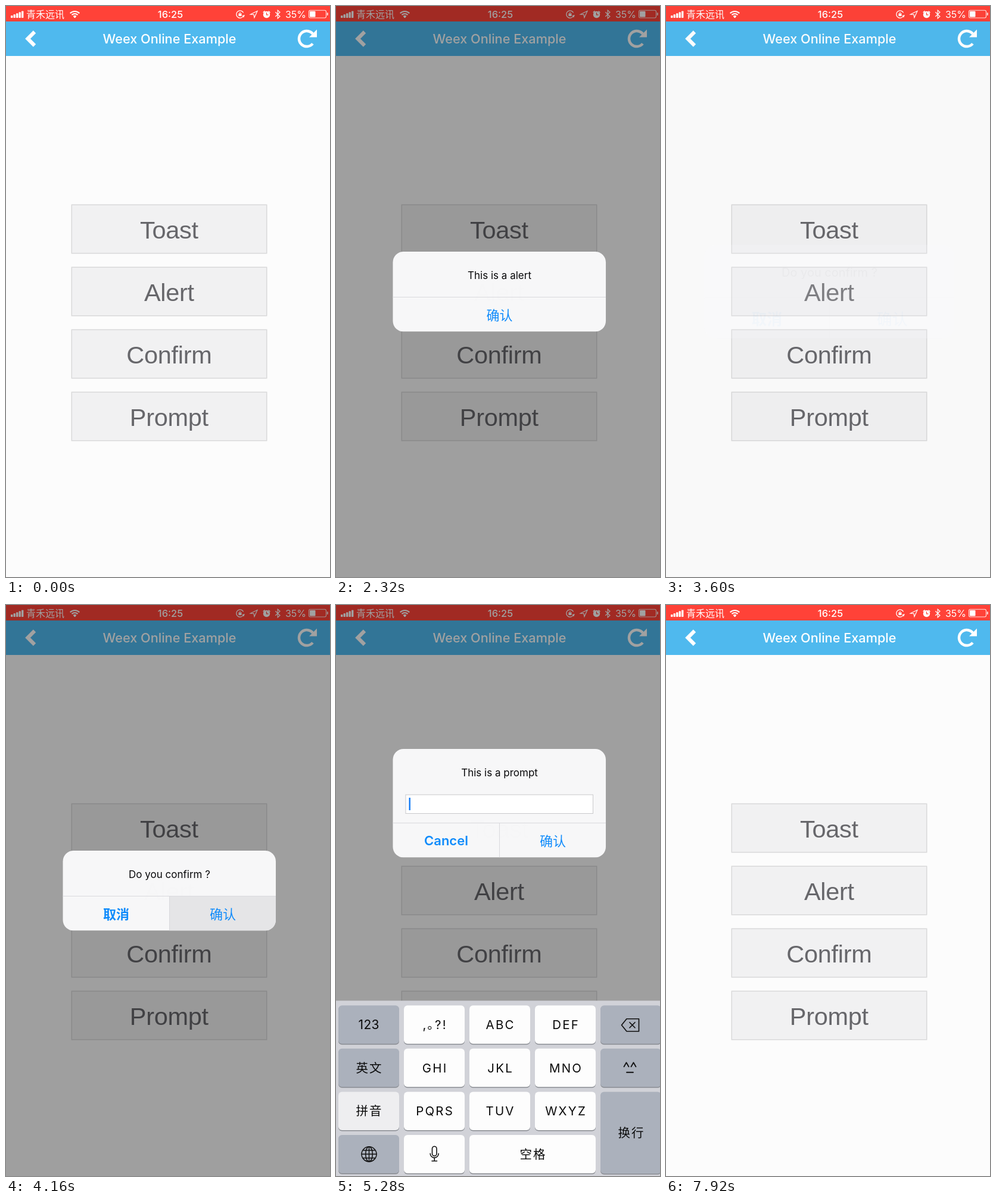
Animation, 544 px wide and 960 px high, one loop 8000 ms. Source, as an HTML page with a canvas:

```html
<!DOCTYPE html>
<html lang="zh">
<head>
<meta charset="utf-8">
<title>Modal demo</title>
<style>
html, body { margin: 0; width: 100%; height: 100%; overflow: hidden; background: #fff; }
canvas { display: block; width: 544px; height: 960px; }
</style>
</head>
<body>
<canvas id="stage"></canvas>
<script>
const W = 544, H = 960, LOOP = 8000;
const canvas = document.getElementById('stage');
const dpr = window.devicePixelRatio || 1;
canvas.width = W * dpr;
canvas.height = H * dpr;
const c = canvas.getContext('2d');

const SANS = 'Inter, "Noto Sans CJK SC", "Noto Sans CJK", sans-serif';
const CJK = '"Noto Sans CJK SC", "Noto Sans CJK", sans-serif';
const WIDE = '"Liberation Sans", Arial, sans-serif';
const BLUE = '#0f8bfb';

// Critically damped settle: 0 before start, then approaches 1
function settle(t, start, w = 0.0228) {
  if (t <= start) return 0;
  const x = (t - start) * w;
  return 1 - (1 + x) * Math.exp(-x);
}
const shown = (t, from, to) => t < to ? settle(t, from) : 1 - settle(t, to);

function text(s, x, y, size, color, o = {}) {
  const ls = o.ls || 0;
  c.font = `${o.weight || 400} ${size}px ${o.font || SANS}`;
  c.letterSpacing = ls + 'px';
  c.textAlign = o.align || 'center';
  c.textBaseline = 'alphabetic';
  c.fillStyle = color;
  c.fillText(s, c.textAlign === 'center' ? x + ls / 2 : x, y);
  c.letterSpacing = '0px';
}

// Text with its capitals or ideographs centred on y
function label(s, x, y, size, color, o = {}) {
  const cjk = s.charCodeAt(0) > 0x2fff;
  text(s, x, y + size * (cjk ? 0.375 : 0.363), size, color, { font: cjk ? CJK : SANS, ...o });
}

function rect(x, y, w, h, color) {
  c.fillStyle = color;
  c.fillRect(x, y, w, h);
}

function round(x, y, w, h, r, color) {
  c.beginPath();
  c.roundRect(x, y, w, h, r);
  c.fillStyle = color;
  c.fill();
}

function line(points, width, color, close) {
  c.beginPath();
  points.forEach(([x, y], i) => i ? c.lineTo(x, y) : c.moveTo(x, y));
  if (close) c.closePath();
  c.lineWidth = width;
  c.strokeStyle = color;
  c.stroke();
}

function shape(points, color) {
  c.beginPath();
  points.forEach(([x, y]) => c.lineTo(x, y));
  c.closePath();
  c.fillStyle = color;
  c.fill();
}

function arc(x, y, r, a, b, width, color) {
  c.beginPath();
  c.arc(x, y, r, a, b);
  c.lineWidth = width;
  c.strokeStyle = color;
  c.stroke();
}

function disc(x, y, r, color) {
  c.beginPath();
  c.arc(x, y, r, 0, Math.PI * 2);
  c.fillStyle = color;
  c.fill();
}

function statusBar() {
  const ink = '#fff', red = '#ff4238';
  rect(0, 0, W, 26, red);
  for (let i = 0; i < 5; i++) {
    const h = 4 + i * 1.9;
    round(8 + i * 4.5, 20 - h, 3.4, h, 0.8, ink);
  }
  text('青禾远讯', 34, 19.5, 16, ink, { align: 'left', font: CJK });
  for (const r of [4, 8, 12]) arc(115.5, 20, r - 1, -Math.PI * 0.75, -Math.PI * 0.25, 2.2, ink);
  disc(115.5, 18.4, 1.6, ink);
  text('16:25', 276, 19.8, 16.5, ink, { weight: 500 });

  arc(393, 14, 6.2, 0.5, Math.PI * 1.85, 1.3, ink);
  shape([[396.5, 16], [401, 15], [399, 19.5]], ink);
  rect(390.5, 13, 5, 4, ink);
  arc(393, 13, 1.7, Math.PI, 0, 1, ink);
  line([[410.5, 14], [422, 8.5], [417, 19.5], [416, 14.3]], 1.2, ink, true);
  disc(437.5, 14.5, 5.7, ink);
  arc(437.5, 14.5, 6.6, -2.6, -2, 1.6, ink);
  arc(437.5, 14.5, 6.6, -1.1, -0.5, 1.6, ink);
  line([[437.5, 11], [437.5, 14.8], [440.5, 14.8]], 1.2, red);
  line([[452.3, 10.3], [460, 17.5], [456.2, 21], [456.2, 7], [460, 10.5], [452.3, 17.7]], 1.2, ink);
  text('35%', 486.5, 19.6, 16, ink);
  c.beginPath();
  c.roundRect(508.5, 7.2, 29, 12.8, 2.5);
  c.lineWidth = 1.1;
  c.strokeStyle = 'rgba(255,255,255,.85)';
  c.stroke();
  round(510, 8.8, 9.5, 9.6, 1, ink);
  round(538.8, 11, 2, 5, 1, 'rgba(255,255,255,.85)');
}

function header() {
  rect(0, 26, W, 58, '#4fb9ee');
  line([[48, 43.5], [36.5, 55], [48, 66.5]], 6.2, '#fff');
  text('Weex Online Example', 274.5, 63, 21.7, '#fff', { weight: 500 });
  arc(505, 55, 13, 0.7, Math.PI * 1.78, 4.6, '#fff');
  shape([[522, 39.5], [522, 52.5], [509, 52.5]], '#fff');
}

function page() {
  rect(0, 84, W, H - 84, '#fcfcfc');
  ['Toast', 'Alert', 'Confirm', 'Prompt'].forEach((name, i) => {
    const y = 334 + i * 105;
    rect(109.5, y - 0.5, 329, 83, '#d9d9da');
    rect(111, y + 1, 326, 80, '#f1f1f2');
    text(name, 274, y + 57, 41.5, '#67676b', { font: WIDE, ls: -0.3 });
  });
}

function dim(a) {
  if (a > 0.002) rect(0, 0, W, H, `rgba(0,0,2,${0.37 * a})`);
}

function toast(t) {
  if (t < 1120 || t > 1620) return;
  const k = Math.max(0, (t - 1420) / 200);
  c.save();
  c.globalAlpha = 1 - k * k * (3 - 2 * k);
  round(148, 466, 248, 112, 10, 'rgba(0,0,0,.72)');
  text('This is a toast', 272, 530, 22.5, '#fff', { weight: 600 });
  c.restore();
}

// d: top, height, title, buttons, from, to, press
function dialog(t, d) {
  const a = shown(t, d.from, d.to);
  if (t < d.from || a < 0.002) return;
  const mid = d.top + d.height / 2, sep = d.top + d.height - 58;
  const grow = t < d.to ? 1 + 0.18 * (1 - a) : 1;
  c.save();
  c.translate(274.5, mid);
  c.scale(grow, grow);
  c.translate(-274.5, -mid);

  c.save();
  c.beginPath();
  c.roundRect(95.5, d.top, 357.5, d.height, 18);
  c.clip();
  c.globalAlpha = Math.sqrt(a);
  rect(95, d.top, 359, d.height, 'rgba(249,249,250,.985)');
  c.globalAlpha = a;
  if (t >= d.press) {
    const x = d.buttons.length > 1 ? 275 : 95;
    rect(x, sep, 454 - x, 58, '#e5e5e7');
  }
  rect(95, sep - 0.5, 359, 1, '#d9d9dd');
  if (d.buttons.length > 1) rect(274, sep, 1, 58, '#d9d9dd');
  c.restore();

  c.globalAlpha = a;
  label(d.title, 274.5, d.top + 39.5, 17, '#08080a');
  const y = sep + 30;
  if (d.buttons.length > 1) {
    label(d.buttons[0], 185, y, 22, BLUE, { weight: 600 });
    label(d.buttons[1], 364, y, 22, BLUE);
  } else {
    label(d.buttons[0], 274.5, y, 22, BLUE);
  }
  if (d.body) d.body(d.top);
  c.restore();
}

// Typing: time, column and row of the key, composed text after it
const taps = [
  [5680, 3, 1, 'n'], [5920, 1, 1, 'ni'], [6140, 1, 1, 'ni h'],
  [6340, 2, 0, 'ni ha'], [6560, 3, 1, 'ni hao']
];
const COMMIT = 6880, PRESS = 7280, CLOSE = 7500, OPEN = 4870;

function composed(t) {
  if (t >= COMMIT) return '';
  return taps.reduce((s, k) => t >= k[0] + 70 ? k[3] : s, '');
}

function field(t) {
  return top => {
    const typing = composed(t), value = t >= COMMIT ? '你好' : typing;
    rect(116.5, top + 76.5, 315.5, 32.5, '#c9c9cc');
    rect(117.5, top + 77.5, 313.5, 30.5, '#fff');
    c.font = `16.5px ${SANS}`;
    const w = value ? c.measureText(value).width : 0;
    if (typing) rect(122, top + 82, w + 1, 21, '#d3d5db');
    if (value) text(value, 122.5, top + 98.5, 16.5, '#08080a', { align: 'left' });
    rect(122.5 + w, top + 82, 2.5, 21, '#1a7ff5');
  };
}

function hand(x, y) {
  c.save();
  c.translate(x, y);
  c.rotate(-0.5);
  c.lineCap = 'round';
  const skin = '#f2a58e';
  for (let i = 0; i < 4; i++) {
    const fx = -5 + i * 4;
    line([[fx * 0.8, 2], [fx, i === 0 || i === 3 ? -8 : -11]], 4, skin);
  }
  line([[4, 7], [11, 0]], 4.2, skin);
  c.beginPath();
  c.ellipse(0.5, 5, 8, 8, 0, 0, Math.PI * 2);
  c.fillStyle = skin;
  c.fill();
  arc(0, 0, 15, -0.9, -0.3, 1.2, '#777');
  arc(0, 0, 15, 2.2, 2.8, 1.2, '#777');
  c.restore();
}

function suggestions(t) {
  const typing = composed(t);
  rect(0, 565, W, 42, '#fafafa');
  rect(0, 565, W, 1, '#d0d0d3');
  rect(0, 607, W, 58, '#fdfdfd');
  rect(0, 606.5, W, 1, '#cfcfd2');
  if (!typing) return;
  ['mi', 'ni', 'm', 'n'].forEach((s, i) =>
    text(s, 30 + i * 59.5, 594, 20, '#8b8b8f'));
  rect(0, 607, 81, 58, '#e2e2e5');
  const full = typing.length > 4;
  const words = full ? ['你好', '', '你敢', '米高', '你搞', '你干', '你高'] : ['你', '米', '尼', '泥', '呢', '拟', '妮'];
  c.save();
  c.beginPath();
  c.rect(0, 607, 489, 58);
  c.clip();
  words.forEach((s, i) => {
    const x = i === 0 ? 40 : i === 1 ? 111 : 180.5 + (i - 2) * 80.7;
    if (s) label(s, x, 636, 26.5, '#0a0a0a');
    else hand(x, 636);
  });
  c.restore();
  rect(489, 607, 1, 58, '#c4c4c8');
  line([[509, 641], [519, 631.5], [529, 641]], 1.8, '#222');
}

const colX = i => 4 + i * 110;
const rowY = i => 673 + i * 72.6;

function key(col, row, s, o = {}) {
  const x = colX(col), y = rowY(row);
  const w = o.w || 102, h = o.h || 64.5;
  const dark = '#abb1bc', base = o.dark ? dark : o.fill || '#fdfdfd';
  round(x, y + 1.5, w, h, 6, '#898c92');
  round(x, y, w, h, 6, o.down ? dark : base);
  if (s) label(s, x + w / 2, y + h / 2, s === '123' ? 21 : 20.5, '#0a0a0a', { ls: s === '123' ? 0.4 : 2.2 });
}

function icons(composing) {
  const ink = '#111';
  c.save();
  c.lineJoin = 'round';
  c.lineCap = 'round';
  line([[479.5, 706], [488, 695.5], [508.5, 695.5], [508.5, 716.5], [488, 716.5]], 1.7, ink, true);
  line([[493, 701.5], [502, 710.5]], 1.7, ink);
  line([[502, 701.5], [493, 710.5]], 1.7, ink);

  if (!composing) {
    line([[483.5, 776], [487.5, 769], [491.5, 776]], 1.8, ink);
    line([[495.5, 776], [499.5, 769], [503.5, 776]], 1.8, ink);
    line([[488, 785.5], [499, 785.5]], 1.8, ink);

    c.beginPath();
    c.roundRect(161.5, 910, 7.5, 16, 3.75);
    c.lineWidth = 1.6;
    c.strokeStyle = ink;
    c.stroke();
    arc(165.2, 922, 7, 0, Math.PI, 1.6, ink);
    line([[165.2, 929], [165.2, 934]], 1.6, ink);
    line([[161, 934.5], [169.5, 934.5]], 1.6, ink);
  }

  arc(55.5, 923, 12.5, 0, Math.PI * 2, 1.5, ink);
  c.beginPath();
  c.ellipse(55.5, 923, 5.8, 12.5, 0, 0, Math.PI * 2);
  c.stroke();
  line([[55.5, 910.5], [55.5, 935.5]], 1.4, ink);
  line([[43, 923], [68, 923]], 1.4, ink);
  line([[45.5, 916.5], [65.5, 916.5]], 1.4, ink);
  line([[45.5, 929.5], [65.5, 929.5]], 1.4, ink);
  c.restore();
}

function keyboard(t, bar) {
  const up = shown(t, OPEN, CLOSE);
  if (t < OPEN || up < 0.002) return;
  const composing = composed(t) !== '';
  const down = (col, row) => taps.some(k => k[1] === col && k[2] === row && t >= k[0] + 5 && t < k[0] + 125);
  c.save();
  c.translate(0, (1 - up) * (295 + bar * 100));
  if (bar > 0.002) {
    c.save();
    c.beginPath();
    c.rect(0, 665 - bar * 100, W, bar * 100);
    c.clip();
    c.translate(0, (1 - bar) * 100);
    suggestions(t);
    c.restore();
  }
  rect(0, 665, W, 295, '#d1d2d8');
  const rows = [[',｡?!', 'ABC', 'DEF'], ['GHI', 'JKL', 'MNO'], ['PQRS', 'TUV', 'WXYZ']];
  rows.forEach((row, r) => row.forEach((s, i) => key(i + 1, r, s, { down: down(i + 1, r) })));
  key(0, 0, '123', { dark: true });
  key(0, 1, '英文', { dark: true });
  key(0, 2, '拼音', { fill: '#eeeef0' });
  key(0, 3, '', { dark: true });
  key(4, 0, '', { dark: true });
  key(4, 1, composing ? '分隔' : '', { dark: true });
  key(4, 2, composing ? '确认' : '换行', { dark: true, h: 137.5 });
  key(1, 3, composing ? '选拼音' : '');
  key(2, 3, composing ? '选定' : '空格', { w: 212 });
  icons(composing);
  c.restore();
}

function draw(t) {
  c.setTransform(dpr, 0, 0, dpr, 0, 0);
  const bar = settle(t, 5735);
  const dialogs = [
    { top: 413, height: 134.5, title: 'This is a alert', buttons: ['确认'], from: 1930, to: 2690, press: 2650 },
    { top: 413, height: 134.5, title: 'Do you confirm ?', buttons: ['取消', '确认'], from: 3590, to: 4300, press: 4150 },
    { top: 242 - bar * 50, height: 182.5, title: 'This is a prompt', buttons: ['Cancel', '确认'],
      from: OPEN, to: CLOSE, press: PRESS, body: field(t) }
  ];
  page();
  header();
  statusBar();
  toast(t);
  dim(Math.max(...dialogs.map(d => shown(t, d.from, d.to))));
  dialogs.forEach(d => dialog(t, d));
  keyboard(t, bar);
}

const start = performance.now();
function tick() {
  draw((performance.now() - start) % LOOP);
  requestAnimationFrame(tick);
}
tick();
</script>
</body>
</html>
```
